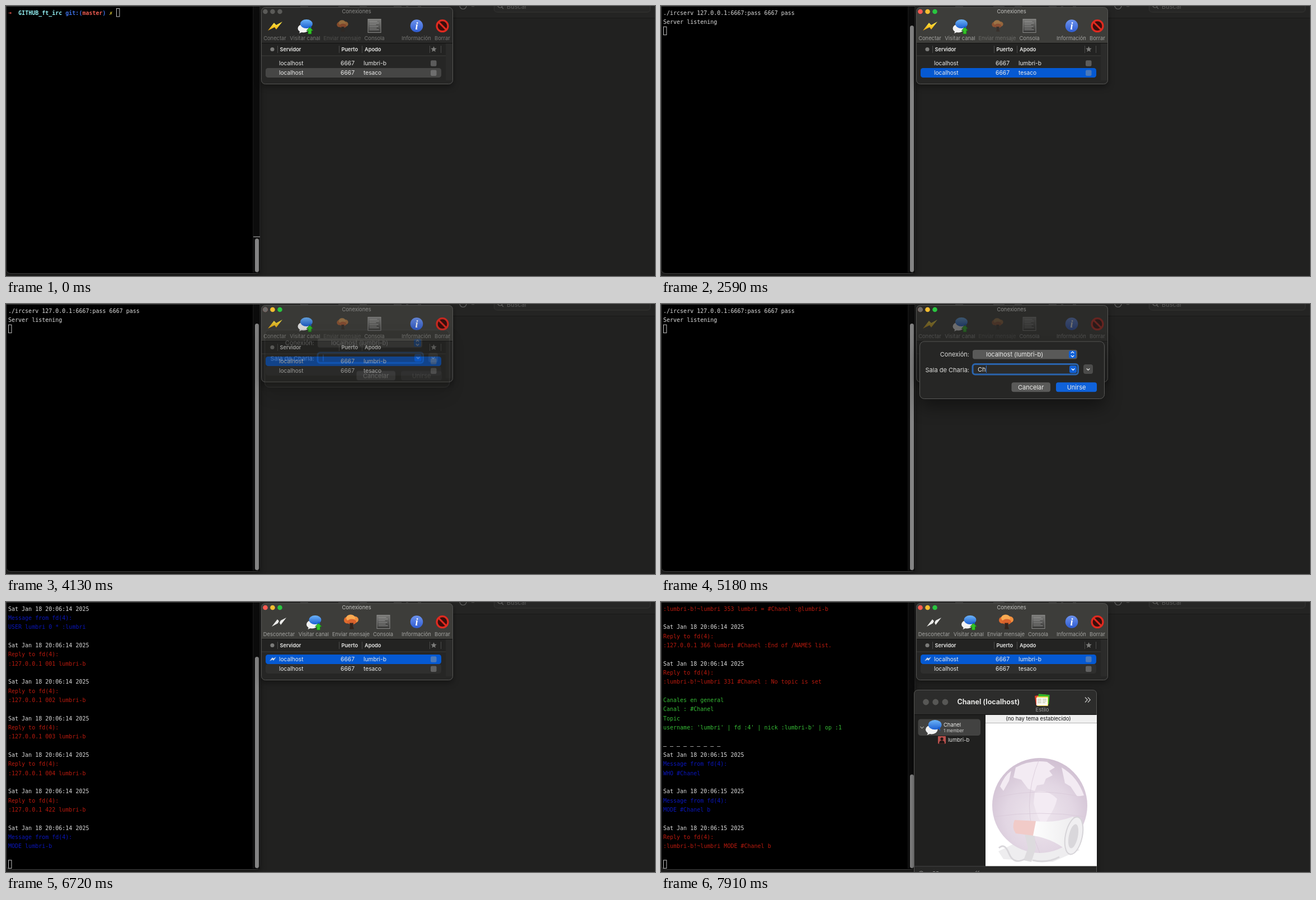
These frames come from a looping animation (1160 by 483 pixels, 8 s). An HTML page:

```html
<!DOCTYPE html>
<html lang="es">
<head>
<meta charset="utf-8">
<title>Servidor IRC</title>
<style>
html, body { margin: 0; width: 100%; height: 100%; overflow: hidden; background: #212120; }
svg { display: block; width: 100vw; height: 100vh; }
text { font-family: Inter, "Open Sans", sans-serif; white-space: pre; }
.mono { font-family: "DejaVu Sans Mono", monospace; font-size: 10px; }
.b { font-weight: 600; }
.bb, .mono.b { font-weight: 700; }
.mid { text-anchor: middle; }
.end { text-anchor: end; }
.win { filter: drop-shadow(0 4px 6px rgba(0,0,0,.4)); }
.sheet { filter: drop-shadow(0 14px 15px rgba(0,0,0,.42)); animation: sheet 8s linear infinite; }
.dim { animation: dim 8s linear infinite; }
.pop { transform-origin: 615px 320px; animation: pop 8s linear infinite; }
.globe { animation: globe 8s linear infinite; }
@keyframes sheet {
  0%, 50.75% { opacity: 0; transform: translateY(-30px); animation-timing-function: ease-out; }
  55.1%, 77.875% { opacity: 1; transform: none; }
  79.625% { opacity: .58; transform: translateY(-15px); }
  81.375%, 100% { opacity: 0; transform: translateY(-30px); }
}
@keyframes dim {
  0%, 50.75% { opacity: 0; }
  55.1%, 77.875% { opacity: .64; }
  79.625% { opacity: .32; }
  81.375%, 100% { opacity: 0; }
}
@keyframes pop {
  0%, 88.37% { opacity: 0; transform: scale(.96); }
  89.2%, 100% { opacity: 1; transform: none; }
}
@keyframes globe {
  0%, 90.125% { opacity: 0; }
  94.5%, 100% { opacity: 1; }
}
</style>
</head>
<body>
<svg id="stage" viewBox="0 0 1160 483" preserveAspectRatio="none">
  <defs>
    <linearGradient id="boltFill" x2="0" y2="1"><stop stop-color="#fff04a"/><stop offset="1" stop-color="#f0a60a"/></linearGradient>
    <linearGradient id="blueFill" x2="0" y2="1"><stop stop-color="#6db4f8"/><stop offset="1" stop-color="#1b5fd2"/></linearGradient>
    <linearGradient id="paperFill" x2="0" y2="1"><stop stop-color="#7b7b79"/><stop offset="1" stop-color="#373736"/></linearGradient>
    <linearGradient id="infoFill" x2="0" y2="1"><stop stop-color="#6d93ee"/><stop offset="1" stop-color="#2f5cd0"/></linearGradient>
    <linearGradient id="hornFill"><stop stop-color="#fdfdfd"/><stop offset="1" stop-color="#ebeaec"/></linearGradient>
    <radialGradient id="globeFill" cx=".5" cy=".62" r=".66"><stop stop-color="#eee6ee"/><stop offset=".55" stop-color="#e2d6e3"/><stop offset="1" stop-color="#cdbccf"/></radialGradient>
  </defs>
</svg>
<script>
const LOOP = 8000;
const NICK = 'lumbri-b', USER = 'lumbri', OTHER = 'tesaco';
let css = '', count = 0;

// Shows a group only inside the given [start, end, start, end…] times
function on(times, body) {
  const id = 'k' + count++;
  const keys = times.map((t, i) => `${t / LOOP * 100}%{opacity:${1 - i % 2}}`).join('');
  css += `@keyframes ${id}{0%{opacity:0}${keys}}#${id}{animation:${id} ${LOOP}ms step-end infinite}`;
  return `<g id="${id}">${body}</g>`;
}
const rect = (x, y, w, h, fill, r = 0, more = '') =>
  `<rect x="${x}" y="${y}" width="${w}" height="${h}" rx="${r}" fill="${fill}" ${more}/>`;
const dot = (x, y, r, fill, more = '') => `<circle cx="${x}" cy="${y}" r="${r}" fill="${fill}" ${more}/>`;
const oval = (x, y, rx, ry, fill, more = '') =>
  `<ellipse cx="${x}" cy="${y}" rx="${rx}" ry="${ry}" fill="${fill}" ${more}/>`;
const path = (d, fill, more = '') => `<path d="${d}" fill="${fill}" ${more}/>`;
const line = (d, color, w = 1) => path(d, 'none', `stroke="${color}" stroke-width="${w}"`);
const text = (x, y, s, fill, size, cls = '') =>
  `<text x="${x}" y="${y}" fill="${fill}" font-size="${size}" class="${cls}">${s}</text>`;
const mono = (x, y, s, fill, cls = '') => text(x, y, s, fill, 10, 'mono ' + cls);
const at = (x, y, body, more = '') => `<g transform="translate(${x} ${y})" ${more}>${body}</g>`;
const scale = (k, body) => `<g transform="scale(${k})">${body}</g>`;

/* ---------- desktop behind ---------- */
function desktop() {
  return rect(0, 0, 1160, 483, '#212120') + rect(456, 0, 704, 21, '#242423') +
    line('M456 21.5H1160', '#191918') +
    rect(872.5, -10, 279, 21, '#272726', 5, 'stroke="#343433"') +
    `<g fill="none" stroke="#60605f" stroke-width="1.2"><circle cx="883" cy="-1" r="4"/><path d="M886 2l3 3"/>
     <circle cx="817" cy="-.5" r="6"/></g>` +
    text(895, 4.5, 'Buscar', '#565655', 11) +
    line('M526 .8h14M594 .8h20M632 .8h13M693 .8h14M715 .8h4M736 .8h6M832 .8h5', '#4a4a49');
}

/* ---------- terminal ---------- */
const INK = { w: '#dcdcdc', r: '#b91a0e', b: '#0a16bb', g: '#36bd36', y: '#d6c53a' };
const ROW = 49 / 3, VISIBLE = 28;

const cursor = (x, row, solid) => solid
  ? rect(x, 4 + row * ROW, 6.2, 15.5, '#c9c9c9')
  : rect(x + .5, 4.5 + row * ROW, 5.4, 14.5, 'none', 0, 'stroke="#c4c4c4"');
const thumb = top => rect(445, top, 7, 476 - top, '#848484', 3.5);

function screen(lines, solid = false) {
  const shown = lines.slice(-VISIBLE);
  const height = 441 * Math.min(1, 30 / (lines.length + 1));
  return shown.map(([ink, s], i) => s ? mono(4, 15.6 + i * ROW, s, INK[ink]) : '').join('') +
    cursor(4, shown.length, solid) + thumb(476 - height);
}
const stamp = sec => ['w', `Sat Jan 18 20:06:${sec} 2025`];
const got = (s, sec = 14) => [stamp(sec), ['b', 'Message from fd(4):'], ['b', s], ['w', '']];
const sent = (s, sec = 14) => [stamp(sec), ['r', 'Reply to fd(4):'], ['r', s], ['w', '']];

function terminal() {
  const boot = [['w', './ircserv 127.0.0.1:6667:pass 6667 pass'], ['w', 'Server listening']];
  const me = `:${NICK}!~${USER}`;
  const hello = [...boot, ...got(`NICK ${NICK}`), ...got(`USER ${USER} 0 * :${USER}`)];
  const login = [...hello,
    ...['001', '002', '003', '004', '422'].flatMap(c => sent(`:127.0.0.1 ${c} ${NICK}`)),
    ...got(`MODE ${NICK}`)];
  const joined = [...login, ...got('JOIN #Chanel'),
    ['y', 'Canales en general'], ['w', 'Resultados 11'],
    ...sent(`${me} JOIN #Chanel`), ...sent('MODE #Chanelt'),
    ...sent(`${me} 353 ${USER} = #Chanel :@${NICK}`),
    ...sent(`:127.0.0.1 366 ${USER} #Chanel :End of /NAMES list.`),
    ...sent(`${me} 331 #Chanel : No topic is set`),
    ['g', 'Canales en general'], ['g', 'Canal : #Chanel'], ['g', 'Topic'],
    ['g', `username: '${USER}' | fd :4' | nick :${NICK}' | op :1`], ['w', ''],
    ['w', '– – – – – – – – –']];
  const who = [...joined, ...got('WHO #Chanel', 15)];
  const mode = [...who, ...got('MODE #Chanel b', 15), ...sent(`${me} MODE #Chanel b`, 15)];

  const prompt = [[4, '➜', '#e5564c'], [22.1, 'GITHUB_ft_irc', '#92f1f4'], [106.3, 'git:(', '#3c6fe2'],
    [136.4, 'master', '#ea5a50'], [172.6, ')', '#3c6fe2'], [184.6, '✗', '#e8d53c']]
    .map(([x, s, c]) => mono(x, 15.6, s, c, 'b')).join('');

  return `<g class="win">${path('M0 0H454V470Q454 478.5 445 478.5H9Q0 478.5 0 470Z', '#000')}</g>` +
    line('M.5 0V470Q.5 478.5 9 478.5H445Q453.7 478.5 453.7 470V0M0 .5H454', '#3e3e3d') +
    rect(442, 1, 11.5, 476, '#0c0c0c') + line('M441.7 1V477', '#1f1f1f') +
    on([0, 1610], line('M442 412.8H454', '#737373', 1.8)) +
    on([0, 1330], prompt + thumb(416)) +
    on([0, 140], cursor(197, 0, false)) +
    on([140, 1120], cursor(197, 0, true)) +
    on([1120, 1330], mono(196.7, 15.6, 'make launch', INK.w) + cursor(263, 0, true)) +
    on([1330, 1400], screen(boot.slice(0, 1), true)) +
    on([1400, 2590], screen(boot, true)) +
    on([2590, 6580], screen(boot)) +
    on([6580, 6720], screen(hello)) +
    on([6720, 7070], screen(login)) +
    on([7070, 7560], screen(joined)) +
    on([7560, 7840], screen(who)) +
    on([7840], screen(mode));
}

/* ---------- icons, drawn around their centre ---------- */
const bolt = fill => path('M-13 8L-2-6L2-2L13-8L2 6L-1 2Z', fill);
const cutBolt = fill => path('M-13 8L-3-5L0-2L-2 2ZM1 1L3-3L13-8L3 5Z', fill);
const bubbles = oval(-3.5, 4, 10, 7.5, '#f2f2f2') +
  path('M-9 8l-2 5 7-3z', '#f2f2f2') + oval(2, -4, 11, 8, 'url(#blueFill)') + path('M6 1l5 5-1-7z', '#1b5fd2');
const visit = bubbles + path('M8 2l6 6h-3v6H5V8H2z', '#33c227', 'stroke="#14750f" stroke-width=".7"');
const burst = oval(-7, -3, 6, 6, '#e06c2d') + oval(6, -4, 7, 6, '#f0903f') + oval(-1, -7, 8, 6, '#f9aa52') +
  oval(1, 0, 8, 5, '#d9622c') + path('M-3 2l7 0-1 5 2 6h-8l1-6z', '#33241d');
const consoleIcon = rect(-11.5, -12, 23, 24, 'url(#paperFill)', 0, 'stroke="#8c8c8a"') +
  line('M-9-8h14M-9-5h17M-9-2h12M-9 1h16M-9 4h13M-9 7h17', '#a4a4a2', .8);
const info = dot(0, 0, 11.3, 'url(#infoFill)') +
  '<text y="6" text-anchor="middle" fill="#fff" style="font:italic bold 18px \'Liberation Serif\',serif">i</text>';
const ban = dot(0, 0, 10, '#3a0d0b', 'stroke="#e02a20" stroke-width="3.2"') + line('M-7-7L7 7', '#e02a20', 3.2);

const lights = (x, y, gap, r, colors) => colors.map((c, i) => dot(x + i * gap, y, r, c)).join('');
const LIT = ['#fe5b52', '#f6bd30', '#29c640'];
const off = c => [c, c, c];

/* ---------- connections window ---------- */
const ACTIVE = [2590, 7070, 7840], IDLE = [0, 2590, 7070, 7840];
const LINKED = 6580;

function labels(linked, main, faint) {
  const names = linked
    ? [[488, 'Desconectar'], [550, 'Visitar canal'], [616.5, 'Enviar mensaje'], [674, 'Consola']]
    : [[480.5, 'Conectar'], [534.5, 'Visitar canal'], [601, 'Enviar mensaje'], [658.5, 'Consola']];
  return [...names, [733.5, 'Información'], [780, 'Borrar']].map(([x, s]) =>
    text(x, 61, s, !linked && s[0] == 'E' ? faint : main, 9.4, 'mid')).join('');
}
function listRow(y, nick) {
  return text(488, y + 3.7, 'localhost', '#ececeb', 10.2) + text(598, y + 3.7, '6667', '#ececeb', 10.3) +
    text(639, y + 3.7, nick, '#ececeb', 10.2) + rect(759, y - 5, 10.5, 10.5, 'rgba(160,160,160,.45)', 2.2);
}
function connections() {
  const bar = fill => path('M456.5 66V9Q456.5 2.5 463 2.5H792Q798.5 2.5 798.5 9V66Z', fill);
  const title = color => text(626.5, 13.2, 'Conexiones', color, 9.4, 'mid');
  const pick = (y, fill) => rect(464, y, 314, 17, fill, 4.5);
  const blue = '#0559d2', gray = '#464645';
  return `<g class="win">${rect(456, 2, 343, 138, '#262625', 7)}</g>` +
    on(IDLE, bar('#2a2a29')) + on(ACTIVE, bar('#3d3d3a')) +
    on([0, LINKED], at(481, 36, bolt('url(#boltFill)')) + at(535, 36, visit) +
      at(601.5, 35.5, scale(.78, burst), 'opacity=".5"') + at(658.5, 35.5, consoleIcon)) +
    on([LINKED], at(488, 36, cutBolt('#ececea')) + at(550.5, 36, visit) +
      at(617, 35.5, burst) + at(674.5, 35.5, consoleIcon)) +
    on([3850, 4060], at(535, 36, visit, 'style="filter:brightness(.55)"')) +
    at(734, 35.5, info) + at(780, 35.7, ban) +
    on([0, 2590], labels(false, '#777775', '#4f4f4d')) +
    on([2590, LINKED], labels(false, '#a3a3a0', '#6a6a67')) +
    on([LINKED, 7070, 7840], labels(true, '#a3a3a0')) +
    on([7070, 7840], labels(true, '#777775')) +
    rect(457, 66, 341, 23, '#232322') + line('M457 66.5H798', '#121211') + line('M457 89H786', '#3c3c3b') +
    rect(786, 67, 12.5, 66, '#2b2b2a') +
    line('M485.5 71V84M595.5 71V84M636.5 71V84M757.5 71V84M777.5 71V84', '#4b4b4a') +
    dot(476, 77.5, 3.6, '#7b7b79') +
    text(489.5, 81, 'Servidor', '#ececea', 9.2, 'b') + text(599.5, 81, 'Puerto', '#ececea', 9.2, 'b') +
    text(641, 81, 'Apodo', '#ececea', 9.2, 'b') +
    path('M764.5 72l1.5 3.5 3.8.3-2.9 2.4.9 3.7-3.3-2-3.3 2 .9-3.7-2.9-2.4 3.8-.3z', '#7b7b79') +
    pick(111, '#2f2f2e') +
    on([0, 2590], pick(111, gray)) + on([2590, 3500], pick(111, blue)) +
    on([3500, 7070, 7840], pick(94, blue)) + on([7070, 7840], pick(94, gray)) +
    listRow(102.2, NICK) + listRow(119.4, OTHER) +
    on([LINKED], at(477, 102, scale(.46, bolt('#e6e6e6')))) +
    `<g class="dim">${rect(457, 3, 341, 136, '#222221', 6)}</g>` +
    on(IDLE, title('#8a8a88') + lights(463.5, 10, 13, 4.3, off('#5a5a58'))) +
    on(ACTIVE, lights(463.5, 10, 13, 4.3, LIT)) +
    on([2590, 4060, 6230, 7070, 7840], title('#c4c4c1')) +
    on([4060, 6230], title('#8a8a88')) +
    on([4060, 6510], dot(463.5, 10, 4.4, '#6a6a68')) +
    rect(456.5, 2.5, 342, 137, 'none', 7, 'stroke="#565654"');
}

/* ---------- join sheet ---------- */
function sheet() {
  const chevron = (x, y, c = '#fff') => line(`M${x - 2.8} ${y - 1.3}l2.8 2.8 2.8-2.8`, c, 1.4);
  const steps = line('M732.8 88l2.7-2.7 2.7 2.7M732.8 92l2.7 2.7 2.7-2.7', '#fff', 1.2);
  const button = (x, w, s, fill, ink = '#eeeeec') =>
    rect(x, 140.3, w, 17, fill, 4) + text(x + w / 2, 152.6, s, ink, 11, 'mid');
  const keys = [4830, 5180, 5320, 5460, 5600, 5880, 6300];
  const typed = keys.slice(0, 6).map((t, i) => on([t, keys[i + 1]],
    `<text x="566" y="121" fill="#ececea" font-size="11">${'Chanel'.slice(0, i + 1)}<tspan dx="-1" fill="#3b86f2">|</tspan></text>`)).join('');
  return `<g class="sheet">` +
    rect(462.5, 67, 330, 102.5, '#262625', 8, 'stroke="#5a5a58"') +
    text(551, 94.3, 'Conexión:', '#dededc', 11, 'end') + text(551, 122, 'Sala de Charla:', '#dededc', 11, 'end') +
    rect(557, 82, 187, 16.5, '#595958', 4) + text(581, 93.6, `localhost (${NICK})`, '#ececea', 11) +
    on([0, 6300], rect(729, 83.5, 13, 13.5, '#1262d8', 3)) + steps +
    rect(557, 108, 188.5, 17.5, '#2b2b2a', 4) +
    on([0, 6300], rect(557, 107.5, 188.5, 18.5, 'none', 4.5, 'stroke="#2a64ad" stroke-width="3"')) +
    rect(730, 110, 13, 13.5, '#1262d8', 3) + chevron(736.5, 116.7) +
    rect(755, 108, 17, 17, '#4c4c4b', 4) + chevron(763.5, 116.7, '#dcdcda') +
    on([0, 4830], line('M567 111V123', '#3b86f2', 1.3)) + typed +
    on([6300], text(566, 121, 'Chanel', '#ececea', 11)) +
    button(626.5, 69.5, 'Cancelar', '#5a5a59') +
    on([0, 4830], button(706, 73, 'Unirse', '#3a3a39', '#7c7c7a')) +
    on([4830, 6230], button(706, 73, 'Unirse', '#0f62da')) +
    on([6230, 6300], button(706, 73, 'Unirse', '#2a76e6')) +
    on([6300], button(706, 73, 'Unirse', '#5a5a59')) + '</g>';
}

/* ---------- chat window ---------- */
function globe() {
  const land = '#f3ebf3';
  return `<g class="globe">` +
    path('M603 446L640 428H735L748 444L700 465L650 462L612 460Z', '#eeedef') +
    dot(677, 364, 85, 'url(#globeFill)') +
    path('M634 296Q660 282 690 286L704 296L694 302L700 310L688 316L684 326L672 328L668 338L656 334L644 318L630 314Z', land) +
    path('M668 340Q690 334 708 352Q704 370 692 386L684 404Q672 384 666 360Z', land) +
    path('M716 296Q744 312 756 346L744 348L732 330L722 324Z', land) +
    path('M606 330Q614 310 626 302L622 320L612 338Z', land) +
    line('M598 350Q677 330 756 350M596 384Q677 372 758 384M677 279Q640 364 677 449', '#d8cad9', .8) +
    path('M650 416L668 418L670 440L662 465L648 462L656 440Z', '#dddbde') +
    line('M650 460Q630 470 622 450T604 440M664 462Q690 468 712 456', '#d9d7db', 3) +
    path('M632 390Q626 403 634 414L666 418L672 392Z', '#f1cbc8') +
    path('M670 392Q705 396 736 384Q756 400 750 432L734 452Q705 424 665 418Z', 'url(#hornFill)') +
    oval(738, 418, 15, 34, '#f0eff1', 'stroke="#d6d4d8" stroke-width="2" transform="rotate(12 738 418)"') +
    oval(737, 419, 8, 22, '#d9d7db', 'transform="rotate(12 737 419)"') + '</g>';
}
function chat() {
  const top = fill => path('M452 201.5V165Q452 157 460 157H771Q779 157 779 165V201.5Z', fill);
  const card = (x, y, c, turn) => rect(x, y, 20, 17, c, 1, `transform="rotate(${turn} 682 174)"`);
  return `<g class="pop"><g class="win">${rect(452, 157, 327, 340, '#20201f', 8)}</g>` +
    on([0, 7840], top('#373735') + lights(473.5, 179, 17.2, 5.4, LIT)) +
    on([7840], top('#2c2c2b') + lights(473.5, 179, 17.2, 5.4, off('#575755'))) +
    text(529.5, 183.4, 'Chanel (localhost)', '#e6e6e4', 12.5, 'bb') +
    card(669, 166, '#e2402c', -8) + card(674, 165, '#35b829', 5) + card(672, 169, '#f5d64a', 0) +
    rect(671, 171, 20, 14, '#fafaf5') + line('M673 174h7M682 174h7M673 177h7M682 177h7M673 180h7M682 180h5', '#a8b08c') +
    text(681.5, 196, 'Estilo', '#9c9c9a', 9.5, 'mid') +
    line('M758 170.5l4.2 4.5-4.2 4.5M763 170.5l4.2 4.5-4.2 4.5', '#c2c2c0', 1.3) +
    line('M452 201.5H779', '#111110') +
    rect(459.5, 209.5, 111.5, 29.5, '#424241', 4.5) +
    line('M463.5 223l3 3 3-3', '#a0a09e', 1.2) + at(487.5, 224, scale(1.08, bubbles)) +
    text(505, 223, 'Chanel', '#ececea', 9.4) + text(505, 232.7, '1 member', '#d2d2d0', 7.9) +
    rect(495, 240, 14, 13.5, '#b8504c', 1) + dot(502, 244.8, 2.6, '#231716') +
    path('M497 253.5Q497 247.5 502 247.5T507 253.5Z', '#231716') +
    text(513, 250, NICK, '#e6e6e4', 9.5) +
    rect(452, 472.5, 327, 12, '#272726') + line('M452 472.8H579.5', '#444443') +
    dot(465, 485.5, 4, 'none', 'stroke="#8a8a88"') + line('M486 482.5h4M492 482.5h4M562 483l3-2M566 483l3-2', '#8a8a88') +
    path('M452.5 483V165Q452.5 157.5 460 157.5H771Q778.5 157.5 778.5 165V483', 'none', 'stroke="#555553"') +
    rect(580, 202, 199, 270.5, '#fff') + globe() +
    on([7210], rect(580, 202, 199, 14.5, '#f0f0f0') + line('M580 216.5H779', '#b4b4b4') +
      text(674.5, 212, '(no hay tema establecido)', '#111', 9.5, 'mid')) + '</g>';
}

document.getElementById('stage').innerHTML += desktop() + terminal() + connections() + sheet() + chat();
document.head.appendChild(document.createElement('style')).textContent = css;
</script>
</body>
</html>
```
